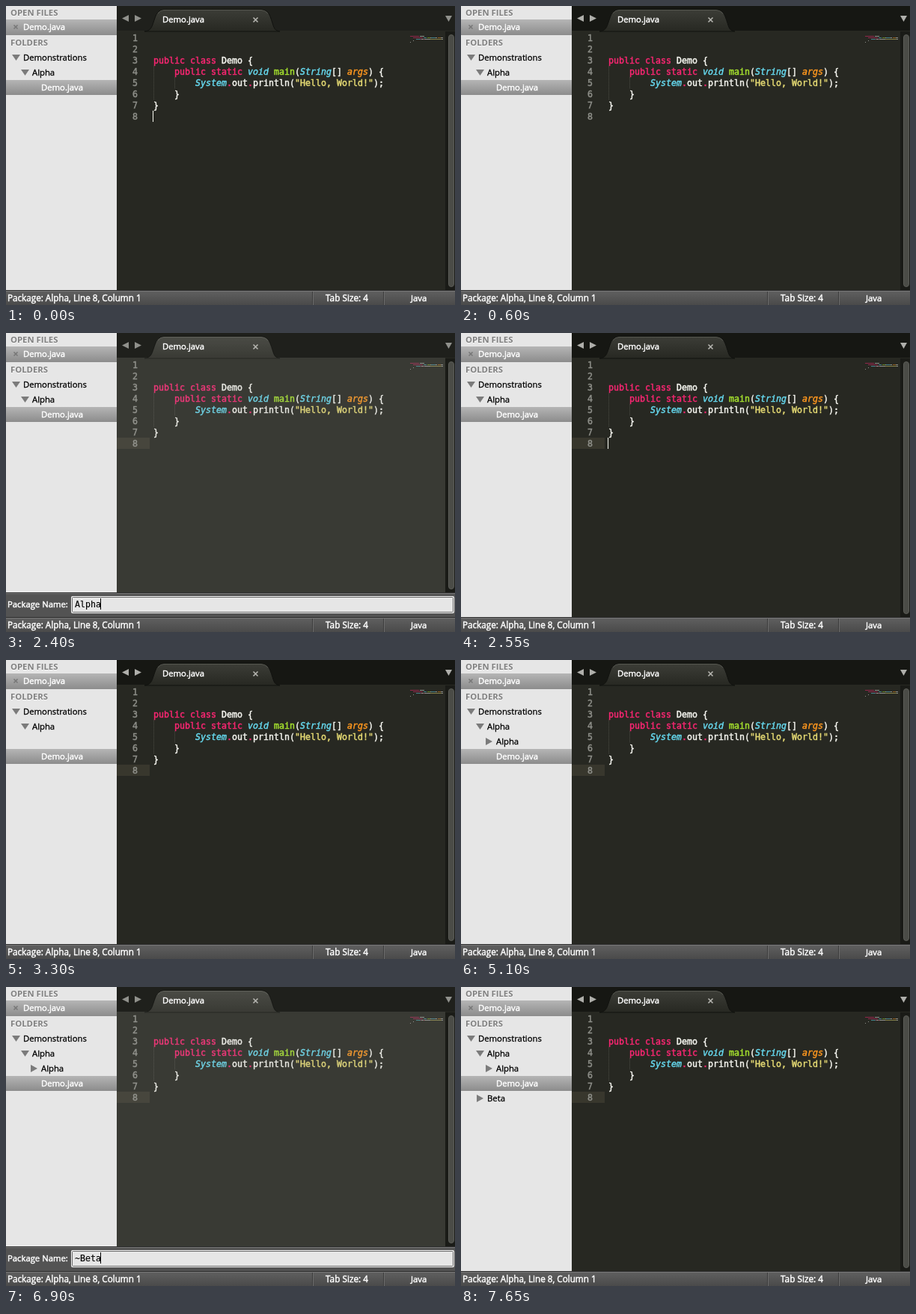
Animation, 600 px wide and 400 px high, one loop 8000 ms. Source, as an HTML page:

```html
<!DOCTYPE html>
<html lang="en">
<head>
<meta charset="utf-8">
<title>Editor</title>
<style>
html, body { margin: 0; width: 100%; height: 100%; overflow: hidden; background: #272822; }
svg { display: block; }
text {
  font: 11.3px "Open Sans", "Noto Sans", sans-serif; white-space: pre;
  fill: currentColor; stroke: currentColor; stroke-width: .3px;
}
.code text, #typed { font: 11.63px "DejaVu Sans Mono", monospace; }
.code text { stroke-width: .45px; }
.code .it { font-style: italic; }
.head { font-weight: bold; color: #808080; stroke: none; text-shadow: 0 1px #f8f8f8; }
.light { color: #fff; stroke-width: .45px; }
.arrow { fill: #7b7b7b; }
.num { color: #8f908a; }
#typed { stroke-width: .15px; }
</style>
</head>
<body>
<svg width="600" height="400" viewBox="0 0 600 400">
  <defs>
    <linearGradient id="sel" x2="0" y2="1">
      <stop offset="0" stop-color="#b5b5b5"/><stop offset="1" stop-color="#8c8c8c"/>
    </linearGradient>
    <linearGradient id="tabFill" x2="0" y2="1">
      <stop offset="0" stop-color="#3c3d37"/><stop offset="1" stop-color="#272822"/>
    </linearGradient>
    <linearGradient id="bar" x2="0" y2="1">
      <stop offset="0" stop-color="#616161"/><stop offset="1" stop-color="#4a4a4a"/>
    </linearGradient>
    <path id="tab" d="M185 34C195 33 195 27 199 16Q202 5 211 5H341Q350 5 353 14C358 27 357 33 366 34Z"/>
    <path id="down" d="M0 0h11l-5.5 8z"/>
    <path id="right" d="M0 0v10l9-5z"/>
  </defs>

  <rect x="148" width="452" height="380" fill="#272822"/>
  <rect id="tabBar" x="148" width="452" height="33"/>
  <use href="#tab" fill="url(#tabFill)" stroke="#11120f"/>
  <path d="M203 10Q206 5.500 211 5.500H341Q346 5.500 350 10" fill="none" stroke="#55564f"/>
  <g id="code" class="code"></g>
  <g id="dim" fill="#a0a09b" opacity=".15">
    <rect x="148" y="33" width="439" height="315"/><use href="#tab"/>
  </g>
  <rect id="caret" x="196" y="140" width="1" height="15" fill="#f8f8f0"/>
  <path id="icons" d="M164 12v9l-9-4.500zM172 12v9l9-4.500zM587 13h9l-4.500 8z" fill="#c0c0bc"/>
  <text class="light" x="209" y="22">Demo.java</text>
  <path d="M330.500 15.500l6 6m0-6l-6 6" stroke="#b5b5b0" stroke-width="1.600"/>
  <rect x="587" y="34" width="13" height="346" fill="#1a1b17"/>
  <rect id="thumb" x="591.500" y="38.500" width="7" rx="3.500" fill="#4b4c47" stroke="#5a5b56"/>

  <rect width="148" height="380" fill="#e6e6e6"/>
  <text class="head" x="6" y="13">OPEN FILES</text>
  <rect y="18" width="148" height="21" fill="url(#sel)"/>
  <path d="M10.500 25.500l5 5m0-5l-5 5" stroke="#777" stroke-width="1.600"/>
  <text class="light" x="23" y="32">Demo.java</text>
  <text class="head" x="6" y="53">FOLDERS</text>
  <use href="#down" class="arrow" x="8" y="65"/><text x="23" y="73">Demonstrations</text>
  <use href="#down" class="arrow" x="20" y="85"/><text x="35" y="93">Alpha</text>
  <g id="alpha"><use href="#right" class="arrow" x="33" y="104"/><text x="47" y="113">Alpha</text></g>
  <g id="file">
    <rect y="99" width="148" height="20" fill="url(#sel)"/>
    <text class="light" x="47" y="113">Demo.java</text>
  </g>
  <g id="beta"><use href="#right" class="arrow" x="21" y="144"/><text x="35" y="153">Beta</text></g>

  <g id="panel">
    <rect y="347" width="600" height="33" fill="#535353"/>
    <path d="M0 347.500H600" stroke="#2c2c2c"/><path d="M0 348.500H600" stroke="#777"/>
    <text class="light" x="2" y="367">Package Name:</text>
    <rect x="87" y="352" width="512" height="23" rx="2" fill="#fafafa"/>
    <rect x="88.500" y="353.500" width="509" height="20" rx="1" fill="#e6e6e6" stroke="#666"/>
    <text id="typed" x="92" y="367"></text>
    <rect id="inputCaret" y="355" width="1" height="15"/>
  </g>

  <rect y="380" width="600" height="20" fill="url(#bar)"/>
  <path d="M0 380.500H600" stroke="#2c2c2c"/><path d="M0 381.500H600" stroke="#777"/>
  <path d="M409.500 382V400M504.500 382V400" stroke="#3c3c3c"/>
  <path d="M410.500 382V400M505.500 382V400" stroke="#6c6c6c"/>
  <text class="light" x="2" y="395" style="font-size:11.700px">Package: Alpha, Line 8, Column 1</text>
  <text class="light" x="427" y="395" style="font-size:11.800px">Tab Size: 4</text>
  <text class="light" x="541" y="395">Java</text>
</svg>
<script>
const $ = id => document.getElementById(id);
const LOOP = 8000, STEP = 150, CHAR = 7, LINE = 15;
const PINK = '#f92672', CYAN = '#66d9ef', GREEN = '#a6e22e',
      ORANGE = '#fd971f', YELLOW = '#e6db74', WHITE = '#f8f8f2';

// Line number, indent, then [text, colour, italic] tokens.
const lines = [
  [3, 0, ['public class ', PINK], ['Demo {', WHITE]],
  [4, 4, ['public static ', PINK], ['void ', CYAN, 1], ['main', GREEN], ['(', WHITE],
    ['String', CYAN, 1], ['[] ', WHITE], ['args', ORANGE, 1], [') {', WHITE]],
  [5, 8, ['System', CYAN, 1], ['.', PINK], ['out', WHITE], ['.', PINK], ['println(', WHITE],
    ['"Hello, World!"', YELLOW], [');', WHITE]],
  [6, 4, ['}', WHITE]],
  [7, 0, ['}', WHITE]]
];

let out = '<rect id="active" x="148" y="140" width="44" height="15" fill="#38372d"/>' +
  '<path d="M197.500 80V125M225.500 95V110" stroke="#4a4b43" stroke-dasharray="1 1"/>';
const baseline = n => 32 + n * LINE;
for (let n = 1; n <= 8; n++) out += `<text class="num" x="169" y="${baseline(n)}">${n}</text>`;
for (const [n, indent, ...tokens] of lines) {
  let col = indent;
  for (const [text, colour, italic] of tokens) {
    const size = text.trimEnd().length;
    out += `<text x="${197 + col * CHAR}" y="${baseline(n)}" color="${colour}" class="${italic ? 'it' : ''}">${text}</text>` +
      `<rect x="${540 + col}" y="${34 + n * 2}" width="${size}" height="1" fill="${colour}" opacity=".5"/>`;
    col += text.length;
  }
}
$('code').innerHTML = out;

// Keys are [time, value]; a null text means the panel is closed.
const typing = [[0, null], [1050, ''], [1500, 'A'], [1800, 'Al'], [1950, 'Alp'], [2100, 'Alph'],
  [2400, 'Alpha'], [2550, null], [5700, ''], [6000, '~'], [6150, '~B'], [6450, '~Be'],
  [6750, '~Bet'], [6900, '~Beta'], [7050, null]];
const blink = [[0, 1], [450, .5], [600, 0], [2550, 1], [3000, .5], [3150, 0], [3600, .5], [3750, 1],
  [4050, 0], [4500, .5], [4650, 1], [4950, .5], [5100, 0], [5550, .5], [5700, 0],
  [7050, 1], [7500, .5], [7650, 0]];
const valueAt = (keys, t) => keys.filter(k => k[0] <= t).pop()[1];
const ramp = (t, from, to) => Math.min(1, Math.max(0, (t - from) / (to - from)));
const set = (id, name, value) => $(id).setAttribute(name, value);
const show = (id, on) => { $(id).style.display = on ? '' : 'none'; };

function draw(now) {
  const t = Math.floor(now % LOOP / STEP) * STEP;
  const text = valueAt(typing, t), open = text !== null, faded = open || t < 150;
  show('panel', open);
  show('dim', open);
  show('active', t >= 1050);
  $('typed').textContent = text || '';
  set('inputCaret', 'x', open ? 91 + text.length * CHAR : 91);
  set('tabBar', 'fill', faded ? '#1f201c' : '#161713');
  set('icons', 'opacity', faded ? .7 : .9);
  set('thumb', 'height', open ? 304 : 337);
  set('caret', 'opacity', valueAt(blink, t));
  set('file', 'transform', `translate(0 ${20 * ramp(t, 3000, 3300)})`);
  set('alpha', 'opacity', ramp(t, 3300, 3600));
  set('beta', 'opacity', ramp(t, 7050, 7500));
}

let start;
function loop(now) {
  start ??= now;
  draw(now - start);
  requestAnimationFrame(loop);
}
draw(0);
requestAnimationFrame(loop);
</script>
</body>
</html>
```
